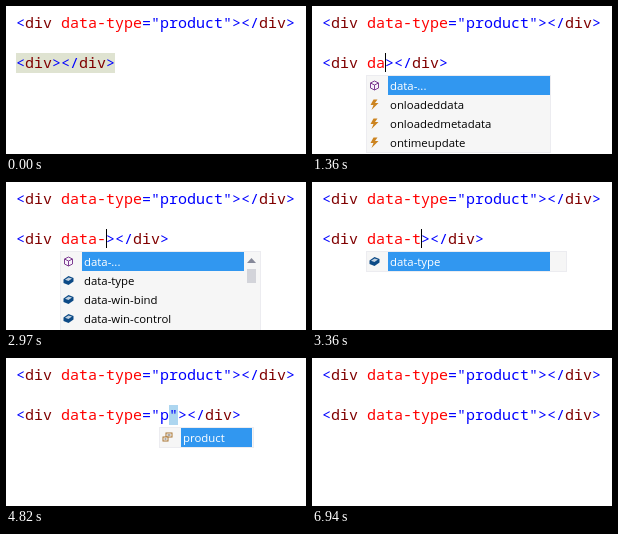
These frames come from a looping animation (300x148 px, 7100 ms). An HTML page:

```html
<!DOCTYPE html>
<html lang="en">
<head>
<meta charset="utf-8">
<title>Attribute completion</title>
<style>
html, body { margin: 0; width: 100%; height: 100%; overflow: hidden; background: #fff; }
svg { display: block; }
text { white-space: pre; }
.code { font: 15px "Noto Sans Mono", "DejaVu Sans Mono", monospace; fill: #00f; }
.tag { fill: #800000; }
.attr { fill: #f00; }
.item { font: 11.4px "Open Sans", "Noto Sans", sans-serif; fill: #000; }
.item.on { fill: #fff; }
</style>
</head>
<body>
<svg id="stage" width="300" height="148" viewBox="0 0 300 148"></svg>
<script>
const LOOP = 7100, COL = 9, LEFT = 10, ROW = 19, TOP = 70, DONE = 5840;
const stage = document.getElementById('stage');

const rect = (x, y, w, h, fill, extra = '') =>
  `<rect x="${x}" y="${y}" width="${w}" height="${h}" fill="${fill}" ${extra}/>`;
const path = (d, fill, extra = '') => `<path d="${d}" fill="${fill}" ${extra}/>`;
const span = (cls, s) => `<tspan class="${cls}">${s}</tspan>`;

// Icons are centred on 0,0
const icons = {
  brick: path('M-5-1L0-4.5L5-2.5V1L0 4.5L-5 2.5Z', '#0c4a86') +
    path('M-3.5-.8L0-3L3.5-2L0 .4Z', '#fff', 'opacity=".75"'),
  aria: '<circle r="4.5" fill="none" stroke="#333" stroke-width="3" stroke-dasharray="4 1.6"/>' +
    path('M1-1H4V-3L8 .5L4 4V2H1Z', '#333'),
  cube: path('M0-4.5L4-2.5V2.5L0 4.5L-4 2.5V-2.5ZM-4-2.5L0-.5L4-2.5M0-.5V4.5', '#f8f2fb',
    'stroke="#7d3d92"'),
  bolt: path('M-1-5H3L.5-1.5H4L-3 5.5L-1 .5H-4Z', '#cc8420'),
  pair: rect(-1.5, -4.5, 6, 4, '#fff', 'stroke="#a87532"') +
    rect(-4.5, -.5, 5, 4, '#fff', 'stroke="#a87532"') +
    path('M0-2.5H3M-3 1.5H-1', 'none', 'stroke="#555"')
};

// x, outer width, selection width, rows as "icon text"
const all = { x: 54, w: 185, sel: 145, soft: true, scroll: true, tall: true,
  rows: ['brick accesskey', 'aria aria-...', 'brick class', 'brick contenteditable'] };
const onD = { x: 54, w: 185, sel: 162,
  rows: ['cube data-...', 'bolt onloadeddata', 'bolt onloadedmetadata', 'bolt ontimeupdate'] };
const onData = { ...onD, rows: onD.rows.slice(0, 3) };
const onDash = { x: 54, w: 201, sel: 162, scroll: true, tall: true,
  rows: ['cube data-...', 'brick data-type', 'brick data-win-bind', 'brick data-win-control'] };
const onType = { ...onDash, scroll: false, tall: false, rows: ['brick data-type'] };
const onValue = { x: 153, w: 95, sel: 71, rows: ['pair product'] };
const softValue = { ...onValue, soft: true };

// start ms, text after "<div", caret shown, popup
const steps = [
  [0, '', 0],
  [130, '', 1],
  [760, '', 0],
  [1120, ' ', 1],
  [1180, ' ', 1, all],
  [1240, ' d', 1, all],
  [1300, ' d', 1, onD],
  [1360, ' da', 1, onD],
  [1660, ' dat', 1, onD],
  [1720, ' data', 1, onD],
  [1750, ' data', 0, onData],
  [2280, ' data', 1, onData],
  [2510, ' data', 1],
  [2970, ' data-', 1, onDash],
  [3200, ' data-t', 1, onDash],
  [3260, ' data-t', 1, onType],
  [3390, ' data-ty', 1, onType],
  [3450, ' data-typ', 0, onType],
  [3680, ' data-typ', 1, onType],
  [3980, ' data-type', 1],
  [4010, ' data-type=""', 1],
  [4040, ' data-type=""', 0],
  [4240, ' data-type=""', 0, softValue],
  [4400, ' data-type=""', 1, softValue],
  [4500, ' data-type=""', 1, onValue],
  [4760, ' data-type="p"', 1, onValue],
  [4820, ' data-type="p"', 0, onValue],
  [5450, ' data-type="p"', 1, onValue],
  [5650, ' data-type="p"', 1],
  [5810, ' data-type="product"', 1],
  [DONE, ' data-type="product"', 0],
  [6440, ' data-type="product"', 1],
  [6940, ' data-type="product"', 0]
];

function line(y, tail) {
  const [name, value] = tail.split('=');
  return `<text class="code" x="${LEFT}" y="${y}">&lt;${span('tag', 'div')}${span('attr', name)}` +
    `${value ? '=' + value : ''}&gt;&lt;/${span('tag', 'div')}&gt;</text>`;
}

function popup({ x, w, sel, rows, soft, scroll, tall }) {
  const h = rows.length * ROW + (tall ? 40 : 1);
  let out = rect(x + .5, TOP - .5, w - 1, h, '#f6f6f6', 'stroke="#ececf0"');
  if (scroll) {
    const sx = x + w - 14;
    out += path(`M${sx} 81L${sx + 4.5} 76L${sx + 9} 81Z`, '#868999') + rect(sx, 87, 9, 14, '#d3d4da');
  }
  out += soft
    ? rect(x + 22.5, TOP + .5, sel - 1, ROW - 1, '#fafafa', 'stroke="#3399ff"')
    : rect(x + 22, TOP, sel, ROW, '#3197f0');
  rows.forEach((row, i) => {
    const [icon, label] = row.split(' '), y = TOP + i * ROW;
    out += `<g transform="translate(${x + 8.5} ${y + 9.5})">${icons[icon]}</g>` +
      `<text class="item${!i && !soft ? ' on' : ''}" x="${x + 24}" y="${y + 14}">${label}</text>`;
  });
  return out;
}

function draw([start, tail, caret, list]) {
  const open = tail.includes('"') && start < DONE;
  const end = LEFT + COL * (4 + tail.length);
  let out = '';
  if (!tail) out += rect(LEFT, 47, 11 * COL, 20, '#dfe3d1');
  if (open) out += rect(end - COL, 47, COL, 20, '#add6f0');
  out += line(22, ' data-type="product"') + line(62, tail);
  if (caret) out += rect(end - (open ? COL : 0), 47, 1, 19, '#000');
  if (list) out += popup(list);
  stage.innerHTML = out;
}

let shown;
const begin = performance.now();
function tick() {
  const t = (performance.now() - begin) % LOOP;
  const step = steps.findLast(s => s[0] <= t);
  if (step !== shown) draw(shown = step);
  requestAnimationFrame(tick);
}
tick();
</script>
</body>
</html>
```
